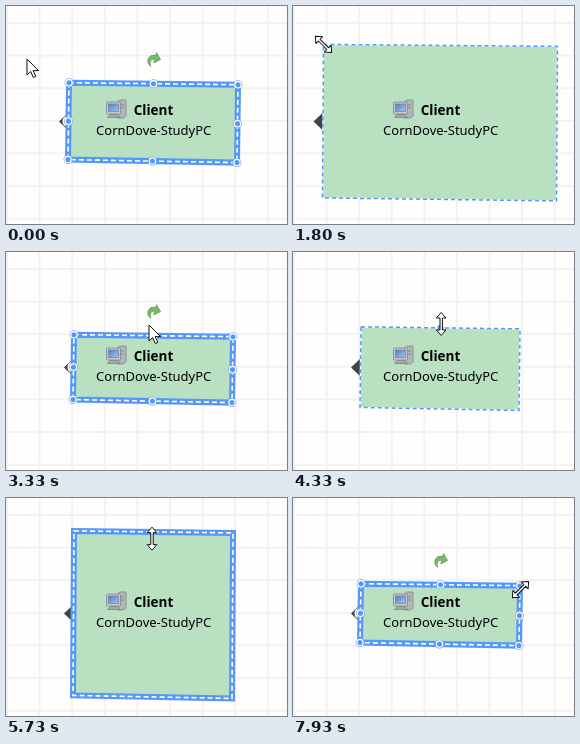
Recreate the animation shown at these times as an HTML page. Size 281x218 px, loop 8000 ms.

```html
<!DOCTYPE html>
<html lang="en">
<head>
<meta charset="utf-8">
<title>Resizing a shape</title>
<style>
html, body { margin: 0; width: 100%; height: 100%; overflow: hidden; background: #fffefc; }
svg { display: block; width: 100%; height: 100%; }
text { font-family: "Noto Sans", "Open Sans", sans-serif; font-size: 13px; text-anchor: middle; }
.bold { font-weight: 700; font-size: 13.5px; }
.blue { fill: none; stroke: #5598fa; }
.white { fill: none; stroke: #fff; }
.cursor path { fill: #fff; stroke: #111; stroke-linejoin: round; }
</style>
</head>
<body>
<svg viewBox="0 0 281 218" preserveAspectRatio="none">
  <defs>
    <pattern id="grid" y="16" width="32.6" height="32.6" patternUnits="userSpaceOnUse">
      <path d="M1 0V32.600M0 1H32.600" stroke="#f3f2f2" stroke-width="2" fill="none"/>
    </pattern>
    <linearGradient id="screen" x2="1" y2="1">
      <stop stop-color="#4f7fc4"/><stop offset="1" stop-color="#a5c4ec"/>
    </linearGradient>
  </defs>
  <rect width="281" height="218" fill="#fffefc"/>
  <rect width="281" height="218" fill="url(#grid)"/>

  <path id="pointer" d="M-10 0L0-9.500V9.500Z" fill="#414243"/>
  <circle id="halo" r="6" fill="#fffefc"/>
  <polygon class="outline" fill="#b9e0c0"/>
  <g id="thick">
    <polygon class="outline blue" stroke-width="6"/>
    <polygon class="outline white" stroke-width="1.6" stroke-dasharray="5 3"/>
  </g>
  <g id="thin">
    <polygon class="outline white" stroke-width="1.4"/>
    <polygon class="outline blue" stroke-width="1.5" stroke-dasharray="4 3"/>
  </g>
  <circle id="dot" r="3" fill="#5598fa"/>
  <g id="handles"></g>
  <path id="rotate" d="M-1 6.500C-7 5-7.500-5 1-5V-8L6.500-2.500L1 2.500V-1C-3-1-4 3-1 6.500Z"
        fill="#7cb970" stroke="#5a9d52" stroke-width=".8"/>

  <g stroke-width=".8">
    <path d="M111 96l3-2h6v16l-3 2h-6z" fill="#b4b7ba" stroke="#83878b"/>
    <path d="M114 99h4m-4 3h4" stroke="#777c81"/>
    <rect x="100.500" y="96" width="14" height="12" rx="1" fill="#c6c8cb" stroke="#83878b"/>
    <rect x="102.500" y="98" width="10" height="7.500" fill="url(#screen)" stroke="#7088a8"/>
    <path d="M104 108.500h8l2.500 3h-13z" fill="#a4a8ac" stroke="#83878b"/>
  </g>
  <text class="bold" x="147.500" y="109">Client</text>
  <text x="147.700" y="129">CornDove-StudyPC</text>

  <g id="cursor" class="cursor">
    <path id="arrow" d="M0 0V16L3.700 12.500L6.300 18.500L8.800 17.400L6.200 11.600H11.500Z"/>
    <path id="double" d="M0-11.500L4.800-6H1.200V6H4.800L0 11.500L-4.800 6H-1.200V-6H-4.800Z"/>
  </g>
</svg>
<script>
const LOOP = 8000, STEP = 200 / 3;
const CENTER = { x: 147, y: 116.4 };
const LAG = 100; // the box trails the cursor

// Each drag changes the half width and half height evenly.
const drags = [
  { start: 1200, end: 1800, w: 32.5, h: 38.3 },
  { start: 2130, end: 2600, w: -37.5, h: -44.3 },
  { start: 4130, end: 5530, w: 0, h: 54.1 },
  { start: 5670, end: 6470, w: 0, h: -54.1 },
  { start: 6670, end: 6740, w: 0, h: -3 }
];

const $ = id => document.getElementById(id);
const outlines = document.querySelectorAll(".outline");
const handles = Array.from({ length: 8 }, () => {
  const group = document.createElementNS("http://www.w3.org/2000/svg", "g");
  group.innerHTML = '<circle r="4.400" fill="#5598fa"/><circle r="3.200" fill="#5598fa" stroke="#fff" stroke-width="1.300"/>';
  return $("handles").appendChild(group);
});

const ramp = (t, start, end) => Math.min(1, Math.max(0, (t - start) / (end - start)));
const mix = (a, b, k) => a.map((v, i) => v + (b[i] - v) * k);
const within = (t, start, end) => t >= start && t < end;
const place = (el, [x, y], angle = 0) =>
  el.setAttribute("transform", `translate(${x} ${y}) rotate(${angle})`);
const show = (el, on) => el.setAttribute("visibility", on ? "visible" : "hidden");

// Slightly uneven corners give the box its hand-drawn look.
function boxAt(t) {
  let w = 84.5, h = 38.7;
  for (const d of drags) {
    const k = ramp(t, d.start, d.end);
    w += d.w * k;
    h += d.h * k;
  }
  const corners = [[-w + .5, -h - 1], [w + .5, -h + 1], [w - .5, h + 1.5], [-w - .5, h - 1.5]]
    .map(([x, y]) => [CENTER.x + x, CENTER.y + y]);
  const mids = corners.map((p, i) => mix(p, corners[(i + 1) % 4], .5));
  return { corners, mids };
}

// Free moves glide between points; during a drag the cursor leads its handle.
function cursorAt(t) {
  const { corners: [topLeft, topRight], mids: [top] } = boxAt(t + LAG);
  if (t < 800) return { kind: "arrow", at: mix([21, 53], [60, 75], ramp(t, 70, 470)) };
  if (t < 2930) return { kind: "double", angle: -45, at: topLeft };
  if (t < 3600) return { kind: "arrow", at: mix(topLeft, [143, 73], ramp(t, 2930, 3330)) };
  if (t < 6730) {
    const drift = 5 * Math.sin(Math.PI * ramp(t, 4130, 5530));
    return { kind: "double", at: [top[0] - 1.5 + drift, top[1]] };
  }
  if (t < 7900) {
    const k = (ramp(t, 6730, 7130) * 3 + ramp(t, 7400, 7670)) / 4;
    return { kind: "arrow", at: mix(top, [232, 84], k) };
  }
  return { kind: "double", angle: 45, at: [topRight[0] + .5, topRight[1] + 4] };
}

function draw(t) {
  const { corners, mids } = boxAt(t);
  const [top, , , left] = mids;
  const cursor = cursorAt(t);
  const dragging = drags.some(d => within(t, d.start + LAG, d.end + 60));
  const selected = !within(t, 1250, 2930) && !within(t, 4070, 6730);

  outlines.forEach(el => el.setAttribute("points", corners.join(" ")));
  [...corners, ...mids].forEach((p, i) => place(handles[i], p));
  place($("pointer"), [left[0] + .5, 115.5]);
  place($("halo"), left);
  place($("rotate"), [top[0], top[1] - 23.5], 15);
  place($("dot"), top);

  show($("thin"), dragging);
  show($("thick"), !dragging);
  for (const id of ["handles", "rotate", "halo"]) show($(id), selected);
  show($("dot"), dragging && t > 4000);

  place($("cursor"), cursor.at, cursor.angle);
  for (const id of ["arrow", "double"]) show($(id), id === cursor.kind);
}

const start = performance.now();
function tick() {
  const t = (performance.now() - start) % LOOP;
  draw(Math.floor(t / STEP + .05) * STEP);
  requestAnimationFrame(tick);
}
tick();
</script>
</body>
</html>
```
